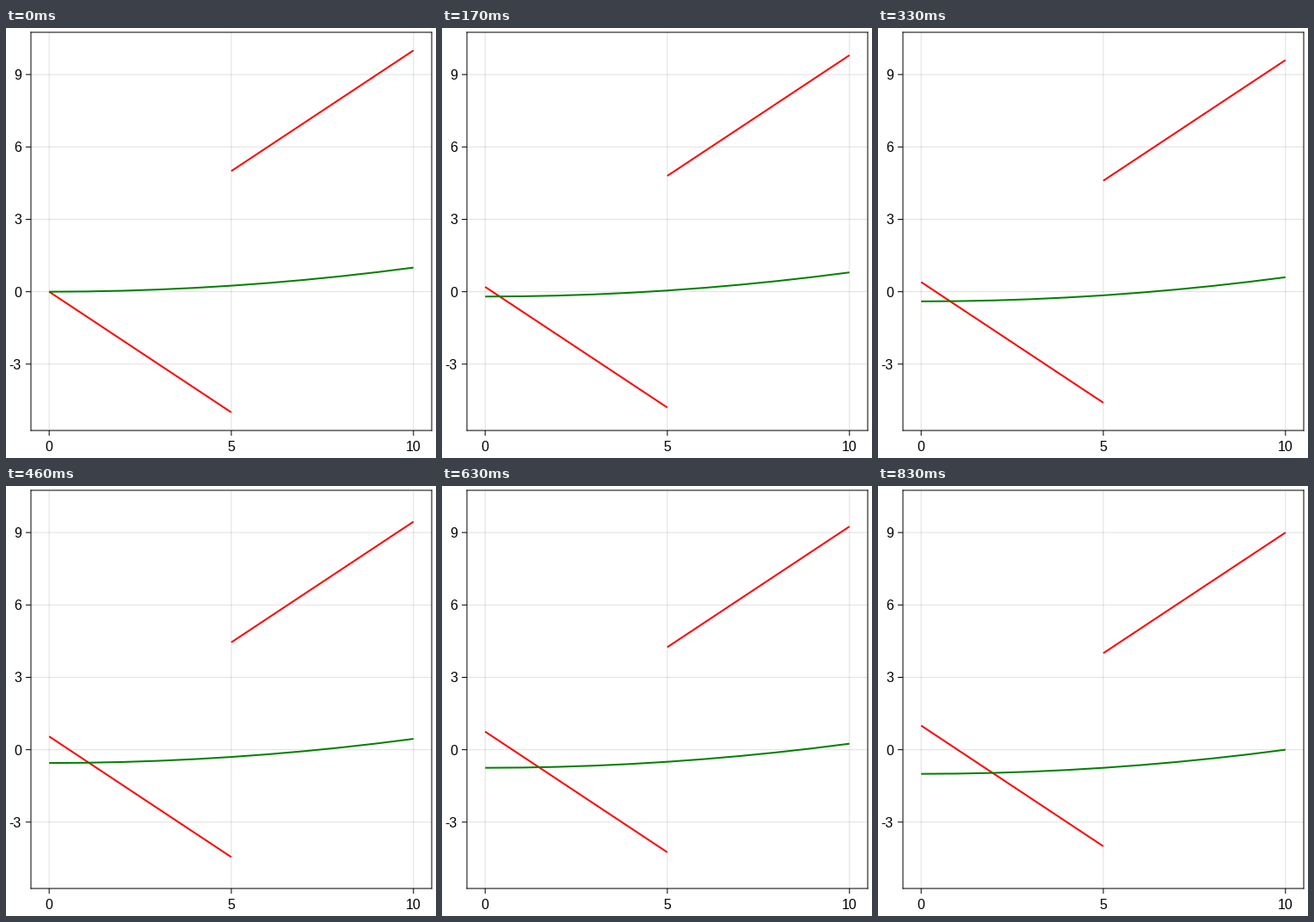
These frames come from a looping animation (500 px wide and 500 px high, 0.87 s). A matplotlib script:

```python
import numpy as np
import matplotlib.pyplot as plt
from matplotlib.animation import FuncAnimation

SIZE, DPI = 500, 100
LEFT, RIGHT, TOP, BOTTOM = 29, 495, 5, 468
TICK = 6
PX = 72 / DPI  # points per pixel
STEP = 0.05

plt.rcParams["font.family"] = "Liberation Sans"
plt.rcParams["axes.unicode_minus"] = False

fig = plt.figure(figsize=(SIZE / DPI, SIZE / DPI), dpi=DPI, facecolor="white")
ax = fig.add_axes([0, 0, 1, 1])
ax.set(xlim=(0, SIZE), ylim=(SIZE, 0))
ax.axis("off")


def to_x(v):
    return LEFT + (np.asarray(v) + 0.5) * (RIGHT - LEFT) / 11


def to_y(v):
    return BOTTOM - (np.asarray(v) + 5.75) * (BOTTOM - TOP) / 16.5


def stroke(xs, ys, color, width=1, alpha=1, cap="butt"):
    return ax.plot(xs, ys, color=color, lw=width * PX, alpha=alpha,
                   solid_capstyle=cap, solid_joinstyle="miter", snap=False)[0]


def label(x, y, text, ha):
    ax.text(x, y, text, ha=ha, va="baseline", fontsize=16 * PX, color="black")


for v in (0, 5, 10):
    x = float(to_x(v))
    stroke([x, x], [TOP, BOTTOM], "black", alpha=0.12)
    stroke([x, x], [BOTTOM, BOTTOM + TICK], "black")
    label(x, 492, str(v), "center")

for v in (-3, 0, 3, 6, 9):
    y = float(to_y(v))
    stroke([LEFT, RIGHT], [y, y], "black", alpha=0.12)
    stroke([LEFT - TICK, LEFT], [y, y], "black")
    label(18, y + 5.9, str(v), "right")

for x in (LEFT, RIGHT):
    stroke([x, x], [TOP, BOTTOM], "black", cap="projecting")
for y in (TOP, BOTTOM):
    stroke([LEFT, RIGHT], [y, y], "black", cap="projecting")

low = np.array([0, 5])
high = np.array([5, 10])
full = np.linspace(0, 10, 11)
falling = stroke(to_x(low), to_y(-low), "red", 2)
rising = stroke(to_x(high), to_y(high), "red", 2)
curve = stroke(to_x(full), to_y(full**2 / 100), "green", 2)


def update(tick):
    # 24 steps per second, rounded to 10 ms ticks
    shift = STEP * ((24 * (tick + 1) - 13) // 100)
    falling.set_ydata(to_y(shift - low))
    rising.set_ydata(to_y(high - shift))
    curve.set_ydata(to_y(full**2 / 100 - shift))
    return falling, rising, curve


anim = FuncAnimation(fig, update, frames=87, interval=10, repeat=True,
                     repeat_delay=0, blit=False)
plt.show()
```
